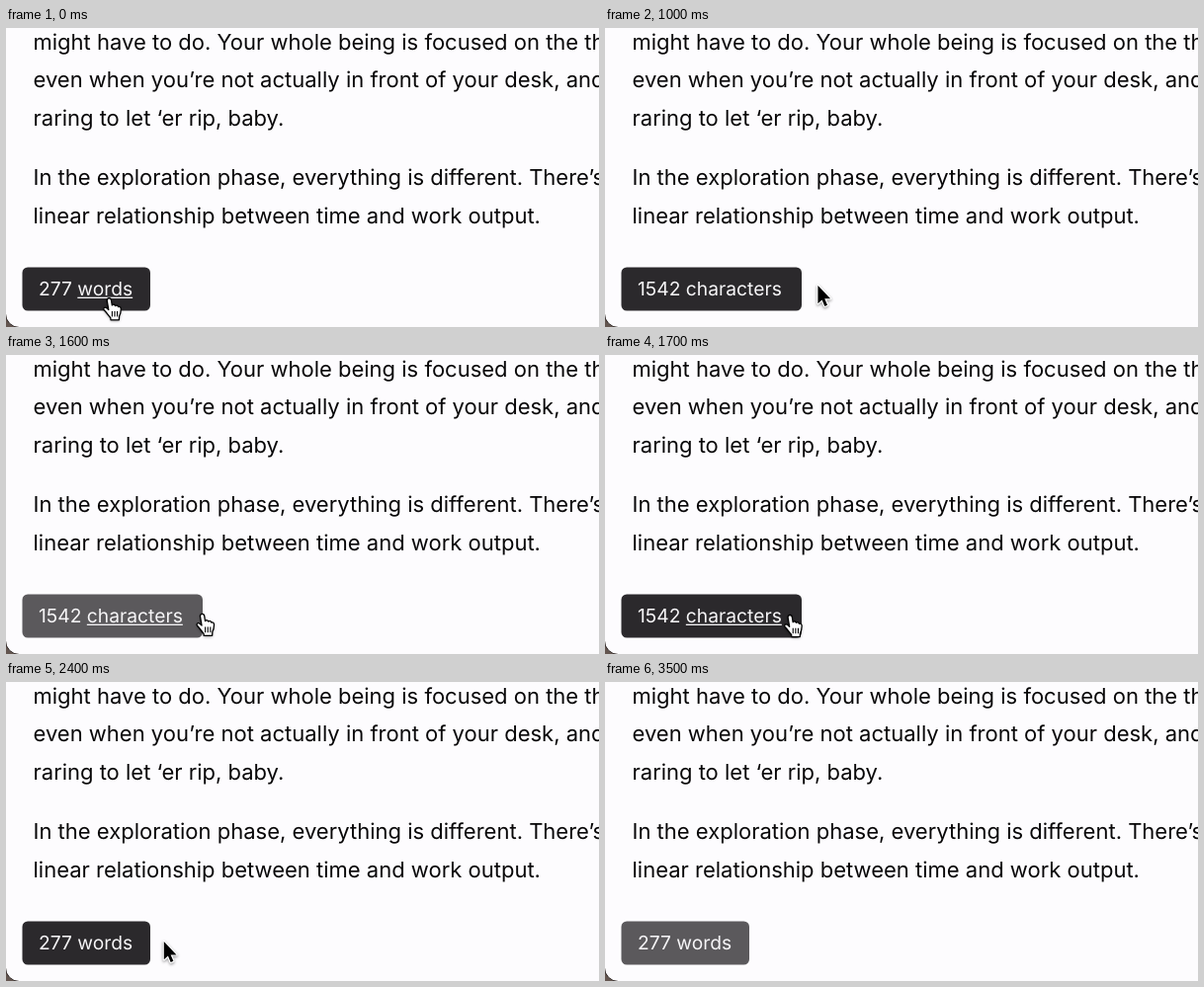
An HTML page with a canvas that plays this animation: 600x303 px, repeating every 4100 ms.

```html
<!DOCTYPE html>
<html lang="en">
<head>
<meta charset="utf-8">
<title>Word counter</title>
<style>
  html, body { margin: 0; width: 100%; height: 100%; overflow: hidden; background: #fdfcfe; }
  canvas { display: block; width: 600px; height: 303px; }
</style>
</head>
<body>
<canvas id="stage"></canvas>
<script>
const W = 600, H = 303, LOOP = 4100, STEP = 100;
const ZOOM = 1.375;
const PAPER = '#fdfcfe', INK = '#080708', DARK = '#2b292c', GREY = '#5b595c';
const PILL = { x: 16.5, y: 242.4, h: 44.1, pad: 12 * ZOOM, baseline: 271.3 };
const TOP = 21.6, LEADING = 28 * ZOOM, GAP = 16 * ZOOM;

const paragraphs = [
  ['might have to do. Your whole being is focused on the thing',
   'even when you’re not actually in front of your desk, and',
   'raring to let ‘er rip, baby.'],
  ['In the exploration phase, everything is different. There’s',
   'linear relationship between time and work output.']
];

const canvas = document.getElementById('stage');
const ctx = canvas.getContext('2d');
const dpr = window.devicePixelRatio || 1;
canvas.width = W * dpr;
canvas.height = H * dpr;
ctx.textRendering = 'geometricPrecision'; // fractional glyph advances

const arrow = new Path2D('M0 0V18.3L4.1 14.5L6.9 21L9.6 19.8L6.8 13.4H12.7Z');
const hand = new Path2D(
  'M4.4 3C4.4 0 8.4 0 8.7 3L9.5 8C10 6.8 12.5 7 12.8 8.6C13.6 7.8 15.5 8 15.8 9.6' +
  'C17 9 18.7 9.8 18.5 12C18.4 15 18 17 16.8 19L16.6 22.8H8.2L8 20.8' +
  'C6 18.6 4 15.5 1.6 13C0 11 2 9.4 3.8 10.6L6 12.6Z');
const creases = new Path2D('M9.6 14V19.6M12.2 14V19.6M14.8 14V19.6');

const easeIn = power => p => p ** power;
const easeOut = power => p => 1 - (1 - p) ** power;

// Each move runs from one point to another and then rests there.
const moves = [
  { start: 700, end: 1100, from: [104, 273], to: [222, 259], ease: easeOut(2) },
  { start: 1300, end: 1900, from: [222, 259], to: [161, 265.5], ease: easeIn(1.36) },
  { start: 2400, end: 2600, from: [159, 262], to: [159, 262], ease: easeOut(1) },
  { start: 2600, end: 3100, from: [159, 262], to: [418, 249], ease: easeOut(2.28) }
];

function pointer(t) {
  const m = moves.findLast(move => t >= move.start) || moves[0];
  const p = Math.min(1, Math.max(0, (t - m.start) / (m.end - m.start)));
  const k = m.ease(p);
  return m.from.map((v, i) => v + (m.to[i] - v) * k);
}

const states = {
  words: { count: '277 ', unit: 'words', width: 129.5 },
  characters: { count: '1542 ', unit: 'characters', width: 182.5 }
};
const stateAt = t => t >= 600 && t < 2400 ? states.characters : states.words;
const hovered = t => t < 3500 && pointer(t)[0] < PILL.x + stateAt(t).width;

// Draws zoomed text and returns its width on the stage.
function write(text, x, y, size, color) {
  ctx.save();
  ctx.translate(x, y);
  ctx.scale(ZOOM, ZOOM);
  ctx.font = size + 'px Inter, "Liberation Sans", sans-serif';
  ctx.fillStyle = color;
  ctx.fillText(text, 0, 0);
  const width = ctx.measureText(text).width * ZOOM;
  ctx.restore();
  return width;
}

function drawPage() {
  ctx.fillStyle = '#63554f';
  ctx.fillRect(0, 0, W, H);
  ctx.beginPath();
  ctx.roundRect(-0.5, -20, W + 40, H + 20.5, [0, 0, 0, 14]);
  ctx.fillStyle = PAPER;
  ctx.fill();
  ctx.strokeStyle = '#29211f';
  ctx.lineWidth = 1;
  ctx.stroke();

  let y = TOP;
  for (const lines of paragraphs) {
    for (const line of lines) {
      write(line, 20 * ZOOM, y, 16, INK);
      y += LEADING;
    }
    y += GAP;
  }
}

function drawPill(t) {
  const { count, unit, width } = stateAt(t);
  ctx.beginPath();
  ctx.roundRect(PILL.x, PILL.y, width, PILL.h, 4 * ZOOM);
  ctx.fillStyle = hovered(Math.max(0, t - STEP)) ? DARK : GREY;
  ctx.fill();

  const color = '#f6f5f7';
  const x = PILL.x + PILL.pad;
  const unitX = x + write(count, x, PILL.baseline, 14, color);
  const unitWidth = write(unit, unitX, PILL.baseline, 14, color);
  if (hovered(t)) {
    ctx.fillStyle = color;
    ctx.fillRect(unitX, PILL.baseline + 1.4, unitWidth, 1.3);
  }
}

function withShadow(draw) {
  ctx.shadowColor = 'rgba(0,0,0,.4)';
  ctx.shadowBlur = 3 * dpr;
  ctx.shadowOffsetY = 1.3 * dpr;
  draw();
  ctx.shadowColor = 'transparent';
}

function drawPointer(t) {
  if (t >= 3500) return;
  const [x, y] = pointer(t);
  ctx.save();
  ctx.lineJoin = 'round';
  if (hovered(t)) {
    ctx.translate(x - 6.2, y);
    ctx.fillStyle = '#fff';
    withShadow(() => ctx.fill(hand));
    ctx.strokeStyle = '#000';
    ctx.lineWidth = 1.3;
    ctx.stroke(hand);
    ctx.lineWidth = 1.1;
    ctx.stroke(creases);
  } else {
    ctx.translate(x + 0.8, y + 1);
    ctx.strokeStyle = '#fff';
    ctx.lineWidth = 2.4;
    withShadow(() => ctx.stroke(arrow));
    ctx.fillStyle = '#000';
    ctx.fill(arrow);
  }
  ctx.restore();
}

const origin = performance.now();

function frame() {
  const now = (performance.now() - origin) % LOOP;
  const t = Math.floor(now / STEP) * STEP;
  ctx.setTransform(dpr, 0, 0, dpr, 0, 0);
  drawPage();
  drawPill(t);
  drawPointer(t);
  requestAnimationFrame(frame);
}
frame();
</script>
</body>
</html>
```
